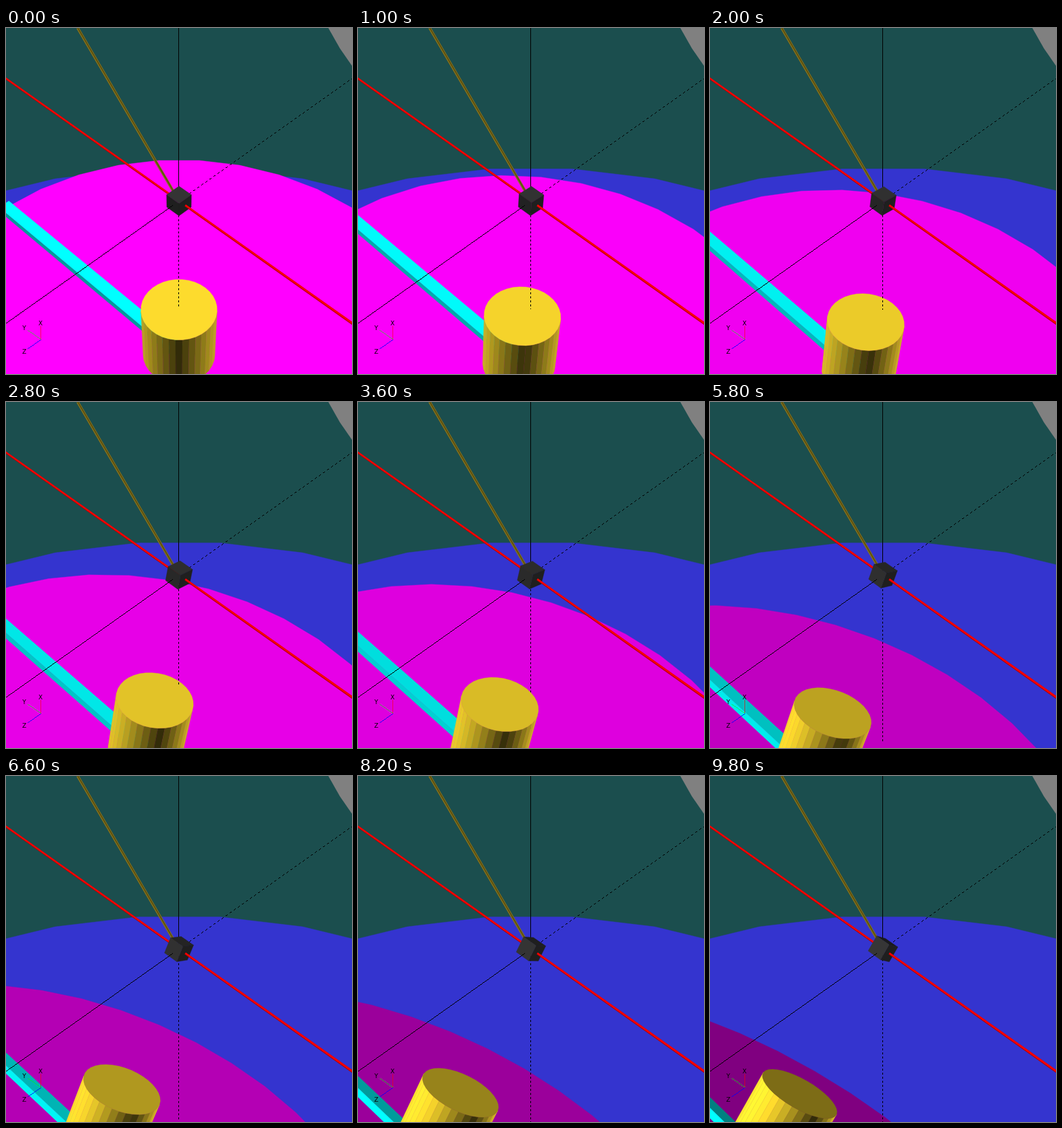
Write an HTML page with a canvas that moves like this. It is 512 px wide and 512 px high and loops after 10 s.

```html
<!DOCTYPE html>
<html lang="en">
<head>
<meta charset="utf-8">
<style>
  html, body { margin: 0; width: 100%; height: 100%; overflow: hidden; }
  canvas { display: block; width: 512px; height: 512px; }
</style>
</head>
<body>
<canvas id="stage" width="512" height="512"></canvas>
<script>
const ctx = document.getElementById('stage').getContext('2d');
const LOOP = 10000, STEP = 200, SWING = Math.PI / 4;
const FOCAL = 256 / Math.tan(Math.PI / 16), DISTANCE = 100, SIDES = 36;
const H = Math.SQRT1_2;
const CAMERA = [H * DISTANCE, -DISTANCE / 2, DISTANCE / 2];
const LIGHT = [0.8165, 0.4082, 0.4082];
const MAGENTA = [255, 0, 255], CYAN = [0, 255, 255], YELLOW = [249, 215, 44];
const GRAY = [51, 51, 51], BLUE = [51, 51, 204];

let angle = 0;

const dot = (a, b) => a[0] * b[0] + a[1] * b[1] + a[2] * b[2];

// The moving parts swing about the y axis.
function swing([x, y, z]) {
  const c = Math.cos(angle), s = Math.sin(angle);
  return [x * c + z * s, y, z * c - x * s];
}

// x points up, y to the back left, z to the front left; seen from 45 degrees above.
function project([x, y, z]) {
  const right = -H * (y + z);
  const up = H * x + (y - z) / 2;
  const near = H * x - (y - z) / 2;
  const scale = FOCAL / (DISTANCE - near);
  return [256 + right * scale, 256 - up * scale, scale];
}

function fill(points, color, seam) {
  ctx.beginPath();
  points.forEach(p => ctx.lineTo(p[0], p[1]));
  ctx.closePath();
  ctx.fillStyle = color;
  ctx.fill();
  if (seam) {
    ctx.strokeStyle = color;
    ctx.lineWidth = 0.4;
    ctx.stroke();
  }
}

// Flat shaded face, skipped when it looks away from the camera.
function face(points, normal, color, turn = swing) {
  const world = points.map(turn), n = turn(normal);
  if (dot(n, CAMERA.map((c, i) => c - world[0][i])) <= 0) return;
  const light = 0.2 + Math.abs(dot(n, LIGHT));
  const rgb = color.map(c => Math.min(255, Math.round(c * light)));
  fill(world.map(project), `rgb(${rgb})`, true);
}

function ringPoint(x, radius, i) {
  const a = i * 2 * Math.PI / SIDES;
  return [x, radius * Math.cos(a), radius * Math.sin(a)];
}

function disc(x, radius, color, turn) {
  const points = Array.from({ length: SIDES }, (_, i) => ringPoint(x, radius, i));
  face(points, [1, 0, 0], color, turn);
}

function cylinder(bottom, top, radius, color) {
  for (let i = 0; i < SIDES; i++) {
    face([ringPoint(bottom, radius, i), ringPoint(bottom, radius, i + 1),
          ringPoint(top, radius, i + 1), ringPoint(top, radius, i)],
         ringPoint(0, 1, i + 0.5), color);
  }
  disc(top, radius, color);
}

function box(low, high, color) {
  for (let axis = 0; axis < 3; axis++) {
    const u = (axis + 1) % 3, v = (axis + 2) % 3;
    for (const side of [-1, 1]) {
      const normal = [0, 0, 0];
      normal[axis] = side;
      const corners = [[0, 0], [1, 0], [1, 1], [0, 1]].map(([a, b]) => {
        const p = [];
        p[axis] = side < 0 ? low[axis] : high[axis];
        p[u] = a ? high[u] : low[u];
        p[v] = b ? high[v] : low[v];
        return p;
      });
      face(corners, normal, color);
    }
  }
}

// Hard-edged one pixel line; when dashed, three pixels off and three on.
function pixelLine([x1, y1], [x2, y2], color, dashed) {
  const dx = x2 - x1, dy = y2 - y1;
  const length = Math.round(Math.max(Math.abs(dx), Math.abs(dy)));
  ctx.fillStyle = color;
  for (let i = 0; i < length; i++) {
    if (dashed && Math.floor(i / 3) % 2 === 0) continue;
    const t = (i + 0.5) / length;
    ctx.fillRect(Math.floor(x1 + dx * t - 0.01), Math.floor(y1 + dy * t), 1, 1);
  }
}

function axis(from, to, dashed) {
  pixelLine(project(from), project(to), '#000', dashed);
}

function stroke(x1, y1, x2, y2, color, width) {
  ctx.beginPath();
  ctx.moveTo(x1, y1);
  ctx.lineTo(x2, y2);
  ctx.strokeStyle = color;
  ctx.lineWidth = width;
  ctx.stroke();
}

// Lengthwise strip of the rod on the y axis, between two heights across it.
function rodStrip(from, to, low, high, color) {
  const edge = (y, offset) => {
    const [px, py, scale] = project([0, y, 0]);
    return [px + 0.577 * offset * scale, py - 0.816 * offset * scale];
  };
  fill([edge(from, low), edge(to, low), edge(to, high), edge(from, high)], color);
}

function rod(from, to) {
  rodStrip(from, to, -0.125, 0.125, '#b00000');
  rodStrip(from, to, -0.05, 0.125, '#ff0000');
}

function compass() {
  const center = [51.5, 461];
  pixelLine(center, [51.5, 441], 'rgba(255,0,0,.6)');
  pixelLine(center, [32, 447], 'rgba(0,255,0,.6)');
  pixelLine(center, [32, 475], 'rgba(0,0,255,.8)');
  ctx.fillStyle = '#000';
  ctx.font = '9px "DejaVu Sans", sans-serif';
  ctx.textAlign = 'center';
  ctx.textBaseline = 'alphabetic';
  ctx.fillText('X', 51, 440);
  ctx.fillText('Y', 27, 447);
  ctx.fillText('Z', 27, 482);
}

function draw(time) {
  angle = SWING * Math.floor((time % LOOP) / STEP) * STEP / LOOP;

  ctx.fillStyle = '#1b4e4e';
  ctx.fillRect(0, 0, 512, 512);
  fill([[477, 0], [494, 30], [512, 56], [512, 0]], '#808080');
  disc(-180, 200, BLUE, p => p);
  disc(-30, 40, MAGENTA);
  box([-30, 0, -1], [-29, 40, 1], CYAN);

  // The lower axis ends inside the post while it still meets the post's top.
  const meetsTop = 20 * Math.tan(angle) < 5;
  const lowerAxis = () =>
    axis([0, 0, 0], [-(meetsTop ? 20 : 30) / Math.cos(angle), 0, 0], true);
  if (!meetsTop) lowerAxis();
  cylinder(-30, -20, 5, YELLOW);
  if (meetsTop) lowerAxis();

  axis([0, 0, 0], [40, 0, 0]);
  axis([0, 0, 0], [0, 0, -40], true);
  stroke(256, 256, 106, 0, '#84711a', 4);
  stroke(256.3, 256, 106.3, 0, '#4f440e', 1.3);
  rod(0, 36);
  box([-1, -1, -1], [1, 1, 1], GRAY);
  rod(-1, -28);
  axis([0, 0, 1], [0, 0, 30]);
  compass();
}

function tick() {
  draw(performance.now());
  requestAnimationFrame(tick);
}
tick();
</script>
</body>
</html>
```
